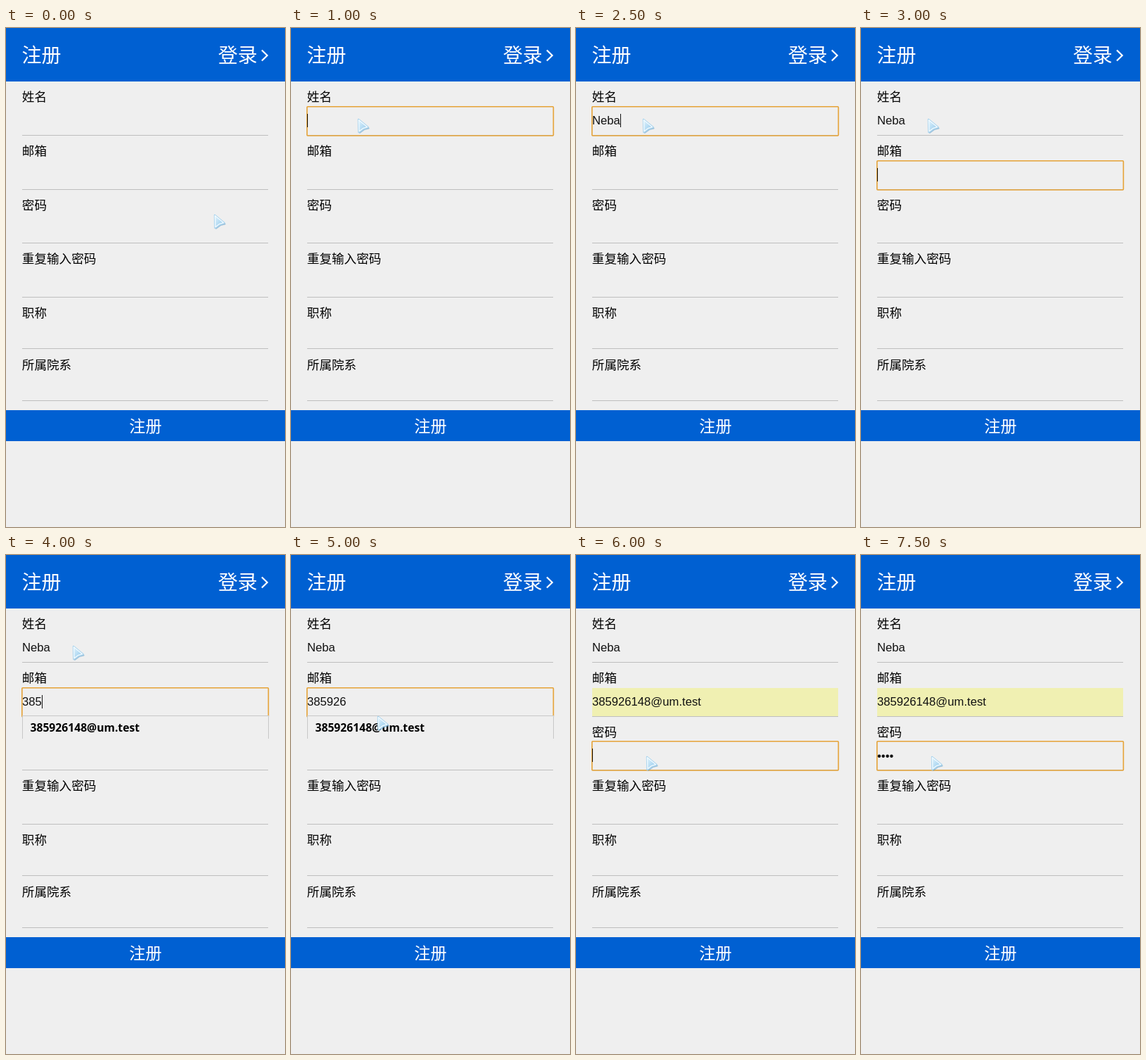
Write an HTML page that moves like this. It is 397 by 709 pixels and loops after 8000 ms.

```html
<!DOCTYPE html>
<html lang="zh-CN">
<head>
<meta charset="utf-8">
<style>
  html, body { margin: 0; width: 100%; height: 100%; overflow: hidden; background: #efefef; }
  svg { display: block; width: 397px; height: 709px; }
  text { font: 17.6px "Noto Sans CJK SC", "Noto Sans CJK", sans-serif; }
  .head { font-size: 28px; fill: #fff; }
  .button { font-size: 23.2px; fill: #fff; text-anchor: middle; }
  .value { font: 16.67px "Liberation Sans", Arial, sans-serif; fill: #111; }
  .hint { font: bold 15.7px "Open Sans", "Noto Sans", sans-serif; }
  .rule { fill: #bebebe; }
  .blue { fill: #0060d2; }
</style>
</head>
<body>
<svg viewBox="0 0 397 709">
  <defs>
    <linearGradient id="ice" x1="0" y1="0" x2="1" y2="1">
      <stop offset="0" stop-color="#e2f4fd"/>
      <stop offset="1" stop-color="#8fc6ea"/>
    </linearGradient>
  </defs>
  <rect width="397" height="709" fill="#efefef"/>
  <rect class="blue" width="397" height="76"/>
  <text class="head" x="22.6" y="49.3">注册</text>
  <text class="head" x="301.8" y="49.3">登录</text>
  <path d="M364 31.5 371.7 39 364 46.5" fill="none" stroke="#fff" stroke-width="2.2"/>
  <rect id="fill" x="23" y="189" width="350" height="41" fill="#f0f0b2"/>
  <g id="form"></g>
  <rect class="blue" y="543" width="397" height="44"/>
  <text class="button" x="198.5" y="574">注册</text>
  <rect id="ring" x="22.8" width="350.6" height="41.2" rx="1" fill="none" stroke="#e5a236" stroke-width="1.6"/>
  <text class="value" x="23" y="137"></text>
  <text class="value" x="23" y="214"></text>
  <text class="value" x="23" y="290.5"></text>
  <rect id="caret" width="1" height="19" fill="#111"/>
  <g id="popup">
    <rect x="23" y="228" width="351" height="33" fill="#efefef"/>
    <path d="M23.5 261V228.5H373.5V261" fill="none" stroke="#c8c8c8"/>
    <text class="hint" x="34.5" y="251"></text>
  </g>
  <g id="pointer" stroke-linejoin="round">
    <path d="M3 3 16.5 14.5 10.5 16 4 20.8Z" fill="#5b9cc8" opacity=".55" stroke="#5b9cc8" stroke-width="2"/>
    <path d="M2 2 15.5 13 9.5 15 2.5 20Z" fill="#a9d3ed" stroke="#a9d3ed" stroke-width="2.4"/>
    <path d="M2.3 2.6 14.6 12.7 9 14.3 3 18.8Z" fill="url(#ice)" stroke="#f3fbff" stroke-width="1.3"/>
  </g>
</svg>
<script>
const $ = id => document.getElementById(id);
const name = "Neba", email = "385926148@um.test", dots = "••••";
const values = document.querySelectorAll(".value");
document.querySelector(".hint").textContent = email;

const rows = [["姓名", 104.3, 152], ["邮箱", 181.3, 229], ["密码", 258.3, 305],
  ["重复输入密码", 334.3, 382], ["职称", 411.3, 455], ["所属院系", 485.3, 529]];
$("form").innerHTML = rows.map(([label, y, line]) =>
  `<text x="22.8" y="${y}">${label}</text>
   <rect class="rule" x="23" y="${line}" width="350" height="1"/>`).join("");

const ringY = [111.8, 188.8, 264.8], caretY = [122, 199, 275];
const start = [295, 264], onName = [94, 128], onHint = [122, 228], below = [106, 276], onPass = [99, 285];

// One entry per half second: pointer, focused field, caret shown, characters in each field
const steps = [
  [start, -1, 0, 0, 0, 0],
  [onName, -1, 0, 0, 0, 0],
  [onName, 0, 1, 0, 0, 0],
  [onName, 0, 0, 0, 0, 0],
  [onName, 0, 1, 2, 0, 0],
  [onName, 0, 1, 4, 0, 0],
  [onName, 1, 1, 4, 0, 0],
  [onName, 1, 0, 4, 0, 0],
  [onName, 1, 1, 4, 3, 0],
  [onName, 1, 1, 4, 6, 0],
  [onHint, 1, 0, 4, 6, 0],
  [below, 1, 1, 4, email.length, 0],
  [onPass, 2, 1, 4, email.length, 0],
  [onPass, 2, 1, 4, email.length, 2],
  [onPass, 2, 1, 4, email.length, 4],
  [onPass, 2, 0, 4, email.length, 4]
];

const show = (id, on) => $(id).setAttribute("visibility", on ? "visible" : "hidden");

function draw(step) {
  const [pos, focus, blink, ...counts] = step;
  [name, email, dots].forEach((s, i) => values[i].textContent = s.slice(0, counts[i]));
  const typed = counts[1], full = typed === email.length;
  show("fill", full);
  show("popup", typed > 0 && !full);
  show("ring", focus >= 0);
  show("caret", blink);
  if (focus >= 0) {
    const width = counts[focus] ? values[focus].getComputedTextLength() : 0;
    $("ring").setAttribute("y", ringY[focus]);
    $("caret").setAttribute("x", Math.round(23 + width));
    $("caret").setAttribute("y", caretY[focus]);
  }
  $("pointer").setAttribute("transform", `translate(${pos})`);
}

const begin = performance.now();
function tick() {
  const t = (performance.now() - begin) % 8000;
  draw(steps[Math.floor(t / 500)]);
  requestAnimationFrame(tick);
}
tick();
</script>
</body>
</html>
```
